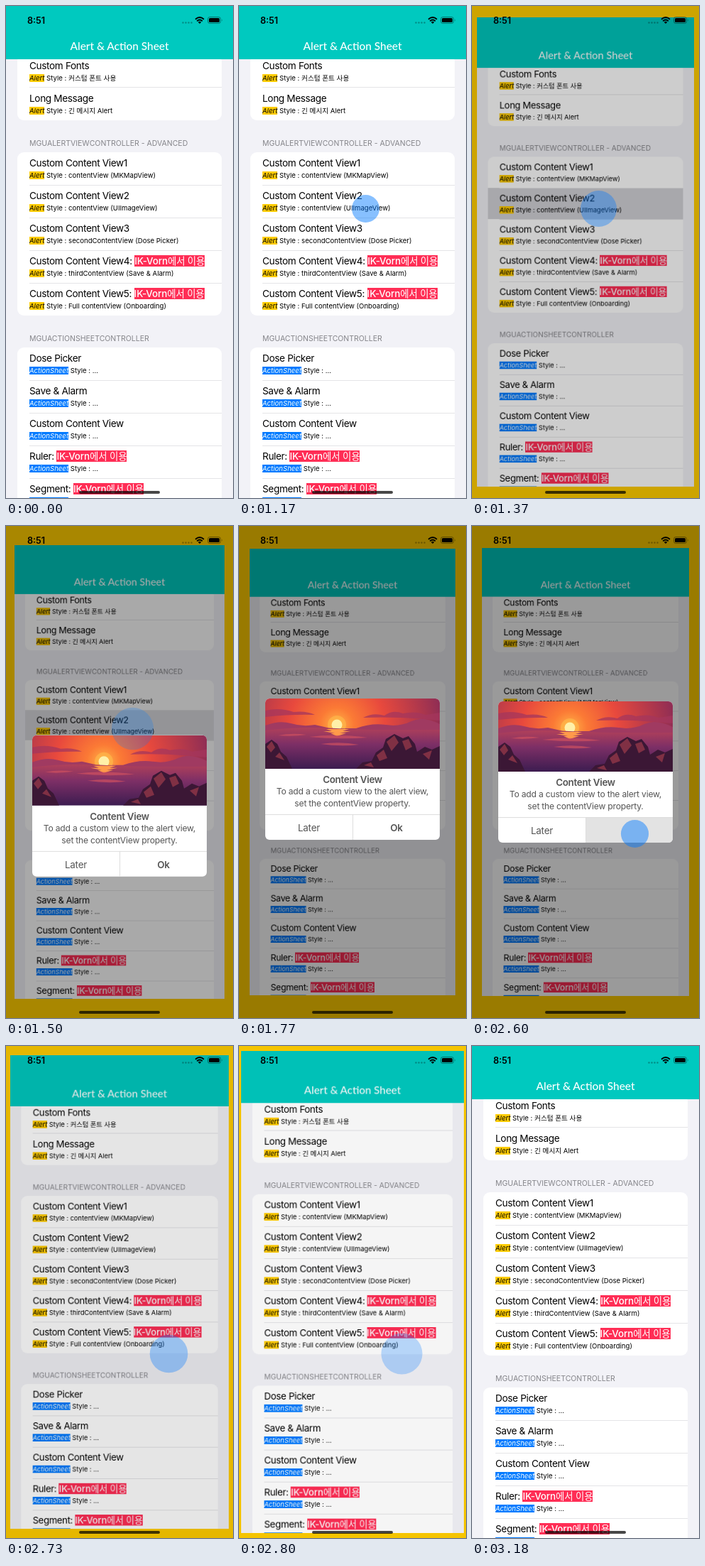
An HTML page for the animation above (3.23 s loop, 320x693 px).

```html
<!DOCTYPE html>
<html lang="ko">
<head>
<meta charset="utf-8">
<title>Alert &amp; Action Sheet</title>
<style>
html, body { margin: 0; width: 100%; height: 100%; overflow: hidden; }
body { position: relative; background: #fc0; color: #000; font-family: Inter, "Noto Sans CJK KR", "Noto Sans CJK", sans-serif; }
#view, #dim, #alert, #touch, #status, #home, nav, .card, h2 { position: absolute; }
#view { width: 320px; height: 693px; overflow: hidden; background: #f2f2f7; will-change: transform; }
nav { left: 0; top: 0; width: 320px; height: 75px; background: #00c9bf; color: #fff; text-align: center;
  font: 500 15.4px/38px Lato, sans-serif; padding-top: 37px; box-sizing: border-box; }
h2 { left: 33px; margin: 0; font-size: 10.5px; line-height: 14px; font-weight: 400; color: #85858a; white-space: nowrap; }
.card { left: 16px; width: 288px; background: #fff; border-radius: 9px; overflow: hidden; }
.row { position: relative; height: 46px; padding: 6px 0 0 17px; box-sizing: border-box; white-space: nowrap; line-height: 18px; }
.row + .row::before { content: ""; position: absolute; left: 17px; right: 0; top: -.5px; height: 1px; background: #e4e4e7; }
.row p { margin: 0; height: 18px; font-size: 13.6px; letter-spacing: -.35px; }
.row small { display: block; height: 18px; font-size: 9.6px; }
.badge { background: #ff2d55; color: #fff; font-weight: 500; font-size: 13.4px; letter-spacing: -.1px; }
i { background: #fc0; }
i.sheet { background: #007aff; color: #fff; }
#dim { inset: 0; background: #000; }
#alert { left: 37px; top: 247px; width: 246px; height: 199px; border-radius: 6px; overflow: hidden; background: #fff;
  color: #555; text-align: center; letter-spacing: -.2px; }
#alert svg { display: block; }
#alert b, #alert span { position: absolute; left: 0; width: 100%; line-height: 18px; font-size: 13.4px; font-weight: 400; }
#alert b { font-weight: 600; }
#alert .text { font-size: 12.1px; line-height: 16.5px; }
#alert .button { top: 163px; width: 123px; height: 36px; line-height: 36px; border-top: 1px solid #ddd; box-sizing: border-box; }
#alert #ok { left: 123px; border-left: 1px solid #ddd; }
#touch { width: 39px; height: 39px; margin: -19.5px; border-radius: 50%; background: rgba(0, 122, 255, .47); }
#status { left: 0; top: 0; }
#home { left: 103px; top: 682.5px; width: 114px; height: 4px; border-radius: 2px; background: rgba(0, 0, 0, .72); }
</style>
</head>
<body>
<div id="view"></div>
<div id="dim"></div>
<div id="alert">
  <svg width="246" height="99" viewBox="0 0 246 99">
    <defs>
      <radialGradient id="sky" gradientUnits="userSpaceOnUse" cx="101" cy="37" r="150">
        <stop offset="0" stop-color="#ffb347"/><stop offset=".16" stop-color="#fb7a35"/>
        <stop offset=".45" stop-color="#e8493d"/><stop offset="1" stop-color="#8d2d55"/>
      </radialGradient>
      <linearGradient id="sea" x2="0" y2="1">
        <stop offset="0" stop-color="#b0405a"/><stop offset=".4" stop-color="#7d2f66"/><stop offset="1" stop-color="#3c1c50"/>
      </linearGradient>
    </defs>
    <path fill="url(#sky)" d="M0 0H246V50H0Z"/>
    <path fill="#a5365c" opacity=".75" d="M138 27Q152 19 168 24Q180 15 194 21Q212 17 226 23L246 20V31Q190 25 138 27ZM0 17Q20 12 40 19Q58 17 70 23Q36 22 0 26Z"/>
    <path fill="#a03a61" d="M0 38Q20 30 36 35T70 37L92 42H128Q150 34 170 37T206 32T246 36V52H0Z"/>
    <circle cx="101" cy="37" r="13" fill="#ffc04d" opacity=".55"/>
    <circle cx="101" cy="37" r="7.5" fill="#fff0a8"/>
    <path fill="url(#sea)" d="M0 45Q50 39 100 42T246 44V99H0Z"/>
    <path fill="#ff9a4a" d="M86 43H118L109 46H120L105 49H114L101 53L92 49H98L82 46H94Z"/>
    <path fill="#cf5060" opacity=".7" d="M62 54Q100 49 144 55Q104 58 62 54ZM78 64Q106 60 132 65Q106 68 78 64ZM18 52Q38 48 58 51Q38 54 18 52Z"/>
    <path fill="#3b1735" d="M0 64L9 58L17 64L22 75L30 82L38 99H0ZM128 99L137 90L150 88L156 76L166 69L170 57L182 50L194 56L202 53L211 64L214 75L225 68L235 72L246 67V99Z"/>
    <path fill="#803044" d="M2 68L9 60L14 69L8 76ZM14 82L20 76L27 87ZM171 61L182 52L188 62L178 74ZM193 60L202 57L207 68L198 73ZM157 80L167 72L172 84L161 88ZM222 78L235 73L231 86ZM139 94L149 90L153 97Z"/>
  </svg>
  <b style="top:105px;letter-spacing:-.3px">Content View</b>
  <span class="text" style="top:123px">To add a custom view to the alert view,<br>set the contentView property.</span>
  <span class="button">Later</span>
  <b class="button" id="ok">Ok</b>
</div>
<div id="touch"></div>
<svg id="status" width="320" height="32">
  <text x="30" y="24.6" font-size="12.6" font-weight="600">8:51</text>
  <g opacity=".3"><circle cx="249.5" cy="23.5" r="1.2"/><circle cx="253.5" cy="23.5" r="1.2"/><circle cx="257.5" cy="23.5" r="1.2"/><circle cx="261.5" cy="23.5" r="1.2"/></g>
  <path d="M267 18.8Q273 13.4 279 18.8M269.2 21.2Q273 17.8 276.8 21.2" fill="none" stroke="#000" stroke-width="1.9"/>
  <path d="M270.8 22.7Q273 20.9 275.2 22.7L273 25Z"/>
  <rect x="284.5" y="15.5" width="18" height="9" rx="2.8" fill="none" stroke="#000" stroke-opacity=".4"/>
  <rect x="286" y="17" width="15" height="6" rx="1.6"/>
  <path d="M304 18.5Q305.5 20 304 21.5Z" opacity=".45"/>
</svg>
<div id="home"></div>
<script>
const LOOP = 3230;
const OPEN = { down: 1170, up: 1270, slide: 1300, x: 178.5, y: 285 };
const CLOSE = { down: 2370, up: 2600, slide: 2600, x: 229, y: 433 };
const $ = id => document.getElementById(id);

const badge = '<span class="badge">IK-Vorn에서 이용</span>';
const alertTag = text => `<i>Alert</i> Style : ${text}`;
const sheetTag = '<i class="sheet">ActionSheet</i> Style : ...';
const row = ([title, sub]) => `<div class="row"><p>${title}</p><small>${sub}</small></div>`;
const card = (top, rows) => `<div class="card" style="top:${top}px">${rows.map(row).join('')}</div>`;
const heading = (top, text) => `<h2 style="top:${top}px">${text}</h2>`;
const content = (n, text, extra = '') => [`Custom Content View${n}${extra}`, alertTag(text)];

$('view').innerHTML =
  card(68.5, [['Custom Fonts', alertTag('커스텀 폰트 사용')], ['Long Message', alertTag('긴 메시지 Alert')]]) +
  heading(187, 'MGUALERTVIEWCONTROLLER - ADVANCED') +
  card(206, [
    content(1, 'contentView (MKMapView)'),
    content(2, 'contentView (UIImageView)'),
    content(3, 'secondContentView (Dose Picker)'),
    content(4, 'thirdContentView (Save &amp; Alarm)', ': ' + badge),
    content(5, 'Full contentView (Onboarding)', ': ' + badge)
  ]) +
  heading(462, 'MGUACTIONSHEETCONTROLLER') +
  card(481, ['Dose Picker', 'Save &amp; Alarm', 'Custom Content View', 'Ruler: ' + badge, 'Segment: ' + badge]
    .map(title => [title, sheetTag])) +
  '<nav>Alert &amp; Action Sheet</nav>';
const picked = document.querySelectorAll('.row')[3];

const clamp = v => Math.min(1, Math.max(0, v));
const remaining = (t, start) => (1 - clamp((t - start) / 500)) ** 3;

// Underdamped spring, going from 1 to 0 in about 600 ms.
function spring(ms) {
  if (ms <= 0) return 1;
  const decay = 11.5, freq = 9.84, s = ms / 1000;
  return Math.exp(-decay * s) * (Math.cos(freq * s) + decay / freq * Math.sin(freq * s));
}

function drawTouch(t) {
  const tap = t < CLOSE.down ? OPEN : CLOSE;
  const age = Math.max(0, t - tap.up);
  const grow = 1 - (1 - clamp(age / 300)) ** 2;
  const style = $('touch').style;
  style.left = tap.x + 'px';
  style.top = tap.y + 'px';
  style.transform = `scale(${1 + .55 * grow})`;
  style.opacity = t < tap.down ? 0 : 1 - clamp(age / 450);
}

function draw() {
  const t = performance.now() % LOOP;
  const closing = t >= CLOSE.up;
  const left = remaining(t, closing ? CLOSE.up : OPEN.up);
  const shrink = closing ? left : 1 - left;
  const offset = closing ? 1 - spring(t - CLOSE.slide) : spring(t - OPEN.slide);
  const pressed = t >= CLOSE.down + 30;
  const highlight = t < 1230 ? 0 : 1 - clamp((t - 1400) / 300);

  $('view').style.transform = `scale(${1 - .091 * shrink})`;
  $('dim').style.opacity = .4 * (closing ? left ** 1.5 : shrink);
  $('alert').style.transform = `translateY(${713 * offset}px)`;
  $('alert').style.visibility = offset > .7 ? 'hidden' : 'visible';
  $('ok').style.background = pressed ? '#e3e3e3' : '';
  $('ok').style.color = pressed ? 'transparent' : '';
  picked.style.background = `rgba(209, 209, 214, ${highlight})`;
  drawTouch(t);
  requestAnimationFrame(draw);
}
draw();
</script>
</body>
</html>
```
